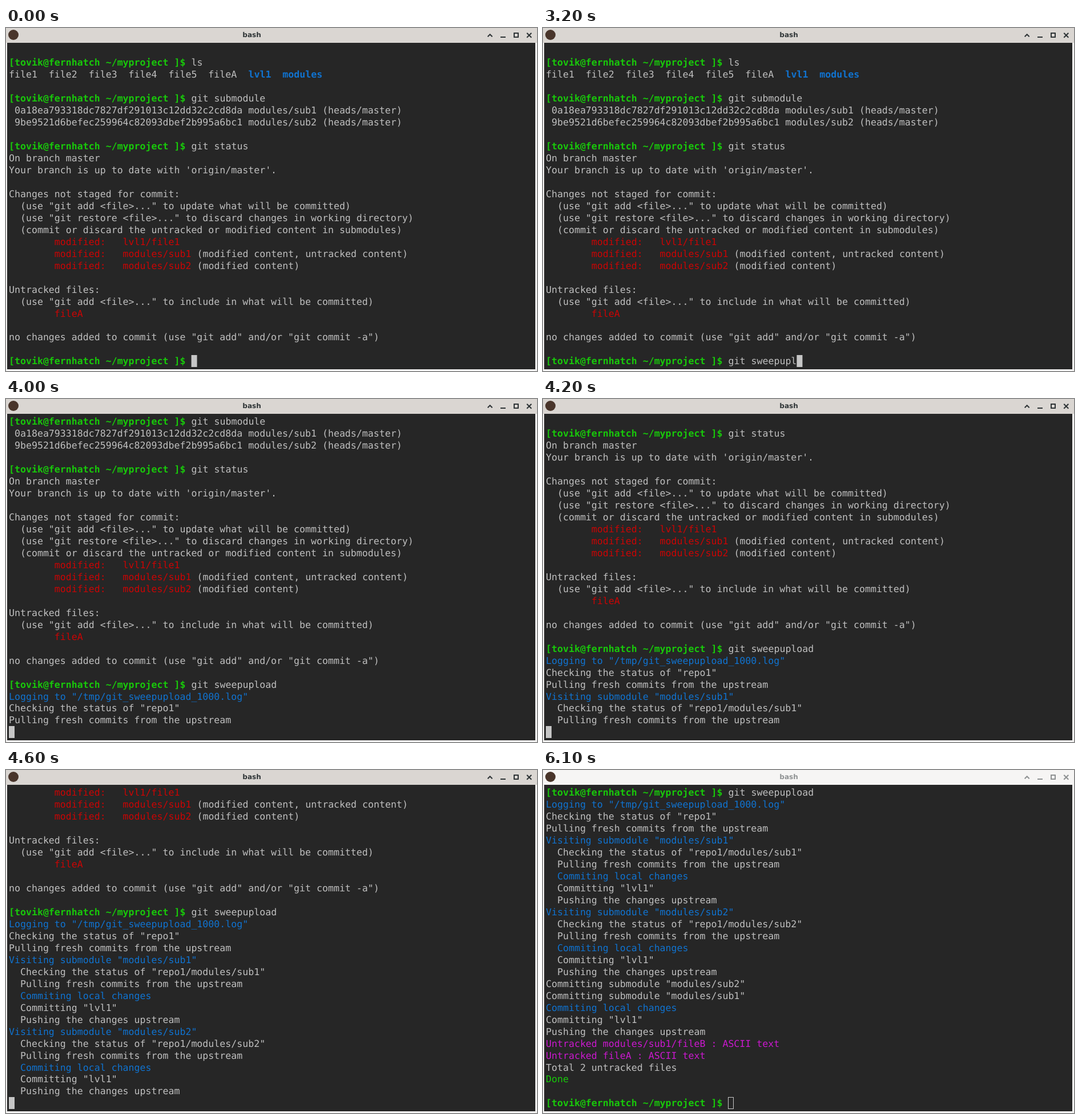
Animation, 930 px wide and 602 px high, one loop 6200 ms. Source, as an HTML page with a canvas:

```html
<!DOCTYPE html>
<html lang="en">
<head>
<meta charset="utf-8">
<title>Terminal</title>
<style>
  html, body { margin: 0; width: 100%; height: 100%; overflow: hidden; background: #f4f3f2; }
  canvas { display: block; }
</style>
</head>
<body>
<canvas id="stage" width="930" height="602"></canvas>
<script>
const ctx = document.getElementById('stage').getContext('2d');

const LOOP = 6200;
const ROWS = 27;
const LEFT = 5, BASE = 45.2;
const CELL_W = 9.987, CELL_H = 20.97;
const MONO = '16.588px "DejaVu Sans Mono", monospace';
const COLORS = {
  text: '#bfbfbf', green: '#18c80a', blue: '#1073d0',
  red: '#cb0404', pink: '#cb18cf', cursor: '#c6c6c6'
};

// A line is a list of runs: [text, color, bold]
const plain = s => [[s, 'text']];
const tint = (s, color) => [[s, color]];
const prompt = cmd => [['[tovik@fernhatch ~/myproject ]$ ', 'green', true], [cmd, 'text']];
const modified = (path, note = '') =>
  [['        modified:   ' + path, 'red'], [note, 'text']];
const visit = sub => [
  tint(`Visiting submodule "modules/${sub}"`, 'blue'),
  plain(`  Checking the status of "repo1/modules/${sub}"`),
  plain('  Pulling fresh commits from the upstream'),
  tint('  Commiting local changes', 'blue'),
  plain('  Committing "lvl1"'),
  plain('  Pushing the changes upstream')
];
const blank = [];
const COMMAND = 'git sweepupload';

const history = [
  blank,
  prompt('ls'),
  [['file1  file2  file3  file4  file5  fileA  ', 'text'], ['lvl1  modules', 'blue', true]],
  blank,
  prompt('git submodule'),
  plain(' 0a18ea793318dc7827df291013c12dd32c2cd8da modules/sub1 (heads/master)'),
  plain(' 9be9521d6befec259964c82093dbef2b995a6bc1 modules/sub2 (heads/master)'),
  blank,
  prompt('git status'),
  plain('On branch master'),
  plain("Your branch is up to date with 'origin/master'."),
  blank,
  plain('Changes not staged for commit:'),
  plain('  (use "git add <file>..." to update what will be committed)'),
  plain('  (use "git restore <file>..." to discard changes in working directory)'),
  plain('  (commit or discard the untracked or modified content in submodules)'),
  modified('lvl1/file1'),
  modified('modules/sub1', ' (modified content, untracked content)'),
  modified('modules/sub2', ' (modified content)'),
  blank,
  plain('Untracked files:'),
  plain('  (use "git add <file>..." to include in what will be committed)'),
  tint('        fileA', 'red'),
  blank,
  plain('no changes added to commit (use "git add" and/or "git commit -a")'),
  blank
];

const output = [
  tint('Logging to "/tmp/git_sweepupload_1000.log"', 'blue'),
  plain('Checking the status of "repo1"'),
  plain('Pulling fresh commits from the upstream'),
  ...visit('sub1'),
  ...visit('sub2'),
  plain('Committing submodule "modules/sub2"'),
  plain('Committing submodule "modules/sub1"'),
  tint('Commiting local changes', 'blue'),
  plain('Committing "lvl1"'),
  plain('Pushing the changes upstream'),
  tint('Untracked modules/sub1/fileB : ASCII text', 'pink'),
  tint('Untracked fileA : ASCII text', 'pink'),
  plain('Total 2 untracked files'),
  tint('Done', 'green'),
  blank,
  prompt('')
];

// [time, value] steps
const typing = [
  [0, 0], [500, 1], [700, 2], [800, 3], [1100, 4], [1600, 5], [1700, 6],
  [1900, 7], [2100, 8], [2300, 9], [3200, 12], [3400, 13], [3500, 14], [3600, 15]
];
const scrolling = [
  [0, 0], [3800, 2], [3900, 3], [4000, 4], [4100, 5], [4200, 7], [4300, 9],
  [4400, 11], [4500, 13], [4600, 16], [4700, 21], [4800, 26]
];
const BLUR_AT = 6100;

const valueAt = (steps, t) => steps.filter(s => s[0] <= t).pop()[1];

function rect(x, y, w, h, color) {
  ctx.fillStyle = color;
  ctx.fillRect(x, y, w, h);
}

function stroke(points) {
  ctx.beginPath();
  points.forEach(([x, y]) => ctx.lineTo(x, y));
  ctx.stroke();
}

function drawFrame(focused) {
  const ink = focused ? '#2e3436' : '#8e9192';
  rect(0, 0, 930, 602, '#f4f3f2');
  rect(0, 0, 930, 26, focused ? '#dad6d2' : '#f6f5f4');
  rect(2, 26, 925, 573, '#262626');

  ctx.fillStyle = '#49352b';
  ctx.beginPath();
  ctx.arc(13, 12, 9, 0, Math.PI * 2);
  ctx.fill();

  ctx.fillStyle = ink;
  ctx.font = 'bold 12px "DejaVu Sans", sans-serif';
  ctx.textAlign = 'center';
  ctx.fillText('bash', 430.5, 16);
  ctx.textAlign = 'left';

  ctx.strokeStyle = ink;
  ctx.lineWidth = 2;
  stroke([[843.7, 15.2], [847.7, 11.2], [851.7, 15.2]]);
  rect(866, 15, 9, 2, ink);
  ctx.strokeRect(890, 9, 7, 7);
  stroke([[912.3, 8.8], [920.3, 16.8]]);
  stroke([[920.3, 8.8], [912.3, 16.8]]);
}

// Draws the runs of one line and returns the column after the last one
function drawLine(runs, row) {
  let col = 0;
  for (const [text, color, bold] of runs) {
    ctx.font = (bold ? 'bold ' : '') + MONO;
    ctx.fillStyle = COLORS[color];
    ctx.fillText(text, LEFT + col * CELL_W, Math.round(BASE + row * CELL_H));
    col += text.length;
  }
  return col;
}

function drawCursor(col, focused) {
  const x = LEFT + col * CELL_W;
  if (focused) {
    rect(x, 574, CELL_W, 21, COLORS.cursor);
  } else {
    ctx.strokeStyle = COLORS.cursor;
    ctx.lineWidth = 1;
    ctx.strokeRect(Math.floor(x) + 0.5, 574.5, 9, 20);
  }
}

function render(t) {
  const focused = t < BLUR_AT;
  const top = valueAt(scrolling, t);
  const typed = COMMAND.slice(0, valueAt(typing, t));
  const lines = [...history, prompt(typed), ...output];
  const last = ROWS - 1;

  ctx.textRendering = 'geometricPrecision';
  drawFrame(focused);
  for (let row = 0; row < last; row++) drawLine(lines[top + row], row);

  // The bottom row is empty while the command is still printing
  const printing = top > 0 && top < output.length;
  const col = printing ? 0 : drawLine(lines[top + last], last);
  drawCursor(col, focused);
}

const start = performance.now();
function tick() {
  render((performance.now() - start) % LOOP);
  requestAnimationFrame(tick);
}
tick();
</script>
</body>
</html>
```
